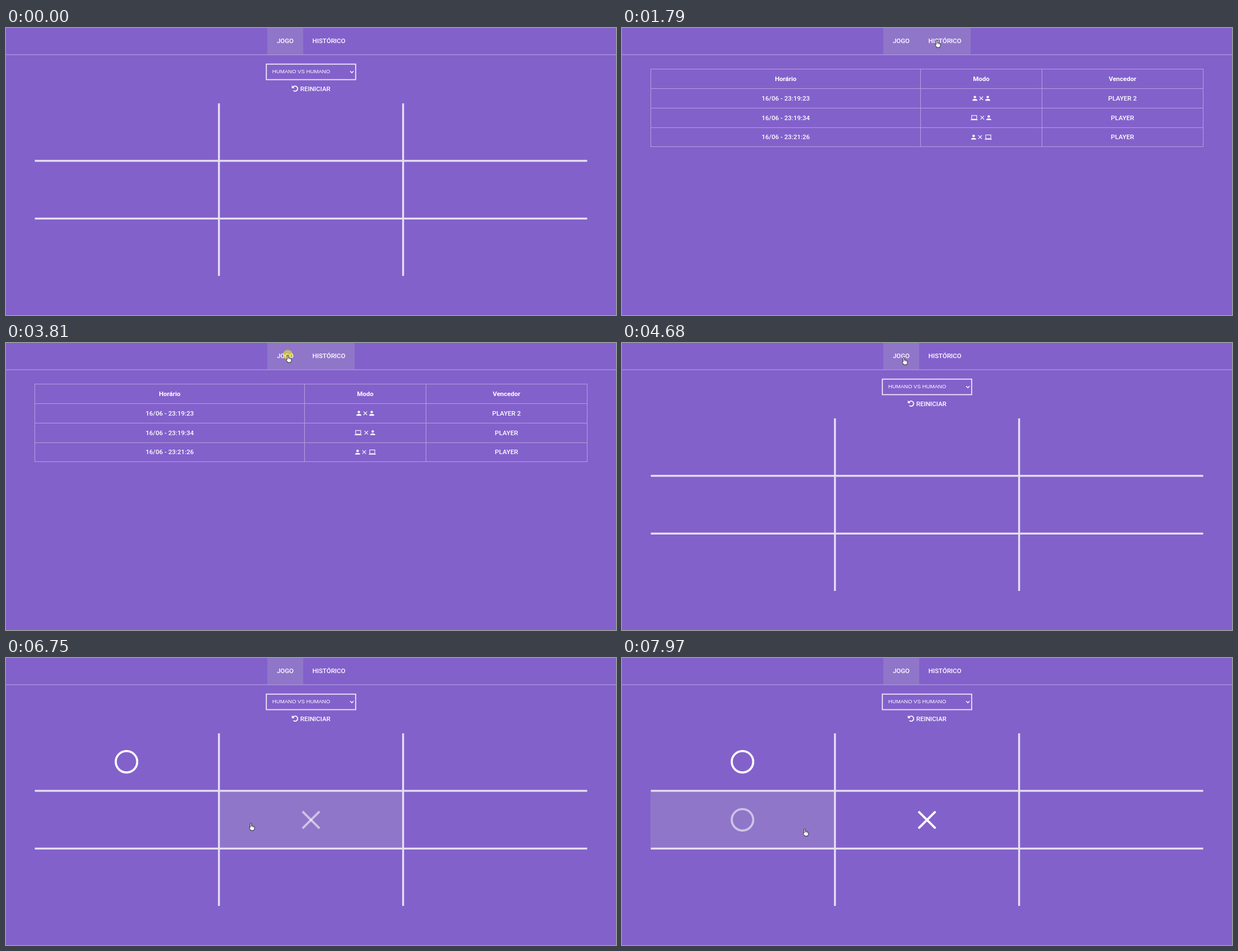
Write an HTML page with a canvas that moves like this. It is 1090x514 px and loops after 8000 ms.

```html
<!DOCTYPE html>
<html lang="pt">
<head>
<meta charset="utf-8">
<title>Jogo</title>
<style>
  html, body { margin: 0; width: 100%; height: 100%; overflow: hidden; background: #8361cb; }
  canvas { display: block; }
</style>
</head>
<body>
<canvas id="stage" width="1090" height="514"></canvas>
<script>
const ctx = document.getElementById('stage').getContext('2d');
const LOOP = 8000;
const FADE = 200;
const BG = '#8361cb';
const GLOW = '#9076c9';
const ROBOTO = 'Roboto, sans-serif';
const ARIAL = '"Liberation Sans", Arial, sans-serif';

// Pointer moves: first step, last step, number of steps, end x, end y.
const START = [1004, 467];
const MOVES = [
  [70, 860, 12, 562, 21],
  [2430, 2430, 1, 555, 21],
  [2580, 2810, 4, 519, 16],
  [3040, 3120, 2, 515, 16],
  [3420, 3580, 3, 503, 21],
  [4680, 4680, 1, 503, 25],
  [4756, 5290, 8, 320, 191],
  [5980, 6370, 6, 437, 295],
  [6830, 7130, 5, 384, 313],
  [7200, 7430, 4, 344, 309],
  [7510, 7660, 3, 326, 305]
];
const CLICKS = [[1640, 1790], [3810, 4040], [5520, 5670], [6520, 6680], [7740, 7890]];

const TABS = { game: [467, 0, 64, 47], history: [531, 0, 92, 47] };
const COLS = [[51, 328], [382, 326.5], [711, 328]];
const ROWS = [[135, 101.5], [239.5, 100.5], [343, 101]];
const CELLS = ROWS.flatMap(([y, h]) => COLS.map(([x, w]) => [x, y, w, h]));

const inside = ([x, y, w, h], p) => p[0] >= x && p[0] < x + w && p[1] >= y && p[1] < y + h;
const showsHistory = t => t >= 1790 && t < 4040;

function pointerAt(t) {
  if (t < 70) return null;
  let [x, y] = START;
  for (const [t0, t1, n, ex, ey] of MOVES) {
    if (t < t0) break;
    const step = n > 1 ? Math.min(n, 1 + Math.floor((t - t0) / (t1 - t0) * (n - 1) + 1e-6)) : 1;
    const u = step / n, e = u * u * (3 - 2 * u);
    x += (ex - x) * e;
    y += (ey - y) * e;
  }
  return [x, y];
}

// Share of the last FADE ms in which the test held: a linear transition.
function faded(t, test) {
  const n = 10;
  let hits = 0;
  for (let i = 0; i < n; i++) if (test(t - i * FADE / n)) hits++;
  return hits / n;
}

function hovered(rect, t) {
  const p = pointerAt(t);
  return p !== null && inside(rect, p);
}

function box([x, y, w, h], color, alpha = 1) {
  ctx.globalAlpha = alpha;
  ctx.fillStyle = color;
  ctx.fillRect(x, y, w, h);
  ctx.globalAlpha = 1;
}

function text(str, x, y, size, weight = 500, align = 'center', family = ROBOTO) {
  ctx.font = `${weight} ${size}px ${family}`;
  ctx.textAlign = align;
  ctx.fillStyle = '#fff';
  ctx.fillText(str, x, y);
}

function stroke(points, width, color = '#fff') {
  ctx.beginPath();
  points.forEach(([x, y], i) => i ? ctx.lineTo(x, y) : ctx.moveTo(x, y));
  ctx.lineWidth = width;
  ctx.strokeStyle = color;
  ctx.stroke();
}

function cross(x, y, r, width) {
  stroke([[x - r, y - r], [x + r, y + r]], width);
  stroke([[x + r, y - r], [x - r, y + r]], width);
}

function ring(x, y) {
  ctx.beginPath();
  ctx.arc(x, y, 19.2, 0, 7);
  ctx.lineWidth = 3.8;
  ctx.strokeStyle = '#fff';
  ctx.stroke();
}

function drawTabs(t) {
  const gameGlow = t < 1950 || t >= 4040 ? 1 : faded(t, s => hovered(TABS.game, s));
  const historyGlow = faded(t, s => showsHistory(s) || hovered(TABS.history, s));
  box(TABS.game, GLOW, gameGlow);
  box(TABS.history, GLOW, historyGlow);
  box([0, 47, 1090, 1.6], '#a58edb');
  text('JOGO', 499, 27.3, 11.5);
  text('HISTÓRICO', 577, 27.3, 11.5);
}

function drawResetIcon(x, y) {
  ctx.beginPath();
  ctx.arc(x, y, 4.5, -2.6, 2.3);
  ctx.lineWidth = 1.9;
  ctx.strokeStyle = '#fff';
  ctx.stroke();
  ctx.beginPath();
  ctx.moveTo(x - 5.9, y - 5.8);
  ctx.lineTo(x - 5.9, y - 0.9);
  ctx.lineTo(x - 1, y - 0.9);
  ctx.closePath();
  ctx.fillStyle = '#fff';
  ctx.fill();
}

function drawMark(t, first, paint) {
  if (t < first) return;
  ctx.globalAlpha = Math.min(1, 0.18 + 0.38 * Math.floor((t - first) / 70));
  paint();
  ctx.globalAlpha = 1;
}

function drawGame(t) {
  ctx.lineWidth = 1.8;
  ctx.strokeStyle = '#eee7f8';
  ctx.strokeRect(465.2, 64.7, 159.6, 27.8);
  text('HUMANO VS HUMANO', 475.8, 81.4, 9.6, 400, 'left', ARIAL);
  stroke([[615, 77.2], [618, 80.2], [621, 77.2]], 1.5);
  drawResetIcon(516.6, 108.6);
  text('REINICIAR', 525.7, 112.7, 11.5, 500, 'left');

  for (const cell of CELLS) box(cell, GLOW, faded(t, s => hovered(cell, s)));

  const line = '#e6dff2';
  for (const x of [378.8, 707.9]) box([x, 135, 3.4, 309], line);
  for (const y of [236.2, 339.6]) box([51.5, y, 987, 3.4], line);

  drawMark(t, 5670, () => ring(215.3, 185.8));
  drawMark(t, 6680, () => cross(545, 290, 15.2, 4));
  drawMark(t, 7890, () => ring(215.3, 289.8));
}

function person(x, y) {
  ctx.fillStyle = '#fff';
  ctx.beginPath();
  ctx.arc(x, y - 2.2, 2.2, 0, 7);
  ctx.fill();
  ctx.beginPath();
  ctx.moveTo(x - 4.4, y + 4.4);
  ctx.lineTo(x - 4.4, y + 3.3);
  ctx.bezierCurveTo(x - 4, y + 0.6, x + 4, y + 0.6, x + 4.4, y + 3.3);
  ctx.lineTo(x + 4.4, y + 4.4);
  ctx.fill();
}

function laptop(x, y) {
  ctx.lineWidth = 1.1;
  ctx.strokeStyle = '#fff';
  ctx.strokeRect(x - 4.5, y - 3.9, 9, 6.6);
  box([x - 6.3, y + 3.3, 12.6, 1.2], '#fff');
}

function drawHistory() {
  const line = '#b5a1de';
  for (const y of [73, 108, 143, 178, 212]) box([51, y, 988, 1], line);
  for (const x of [51, 533, 750, 1038]) box([x, 73, 1, 140], line);

  ['Horário', 'Modo', 'Vencedor'].forEach((label, i) => text(label, [292.5, 642, 894.3][i], 95, 11.5, 700));

  const games = [
    ['16/06 - 23:19:23', 'PLAYER 2', [person, 630.5], 642, [person, 653.5]],
    ['16/06 - 23:19:34', 'PLAYER', [laptop, 629.3], 643.8, [person, 655.3]],
    ['16/06 - 23:21:26', 'PLAYER', [person, 628.3], 640, [laptop, 654.5]]
  ];
  games.forEach(([time, winner, [iconA, xa], xc, [iconB, xb]], i) => {
    const y = 125.8 + 34.8 * i;
    text(time, 292.5, y + 4, 11.6);
    text(winner, 894.3, y + 4, 11.6);
    iconA(xa, y);
    cross(xc, y, 3.2, 1.1);
    iconB(xb, y);
  });
}

const HAND = new Path2D(
  'M-1.2 8V1.5Q-1.2.3 0 .3Q1.2.3 1.2 1.5V5Q2.3 4.3 3.1 5.4Q4.2 4.7 4.9 5.9' +
  'Q6.6 5.5 6.6 7.2V9.6Q6.6 11 5.4 12.2V13.4H-.3V12.5L-2.9 9Q-3.1 7.2-1.2 8Z');
const ARROW = new Path2D('M.5.8V14.5L3.7 11.5L5.8 16.4L8 15.4L5.9 10.7H10.2Z');

function drawPointer(t) {
  const p = pointerAt(t);
  if (!p) return;
  if (CLICKS.some(([a, b]) => t >= a && t < b)) {
    ctx.beginPath();
    ctx.arc(p[0] + 0.5, p[1], 8.8, 0, 7);
    ctx.fillStyle = 'rgba(255, 248, 0, 0.5)';
    ctx.fill();
  }
  const targets = [TABS.game, TABS.history, ...(showsHistory(t) ? [] : CELLS)];
  const hand = targets.some(rect => inside(rect, p));
  const shape = hand ? HAND : ARROW;
  ctx.save();
  ctx.translate(Math.round(p[0]) + 0.5, Math.round(p[1]) + 0.5);
  ctx.lineWidth = 0.9;
  ctx.lineJoin = 'round';
  ctx.strokeStyle = '#161220';
  ctx.fillStyle = '#fff';
  ctx.fill(shape);
  ctx.stroke(shape);
  if (hand) {
    for (const [x, y] of [[1.2, 5], [3.1, 5.6], [4.9, 6]]) stroke([[x, y], [x, y + 2.2]], 0.6, '#161220');
  }
  ctx.restore();
}

function draw(t) {
  box([0, 0, 1090, 514], BG);
  drawTabs(t);
  if (showsHistory(t)) drawHistory();
  else drawGame(t);
  drawPointer(t);
}

let origin = null;
function tick(now) {
  origin ??= now;
  draw((now - origin) % LOOP);
  requestAnimationFrame(tick);
}
draw(0);
requestAnimationFrame(tick);
</script>
</body>
</html>
```
